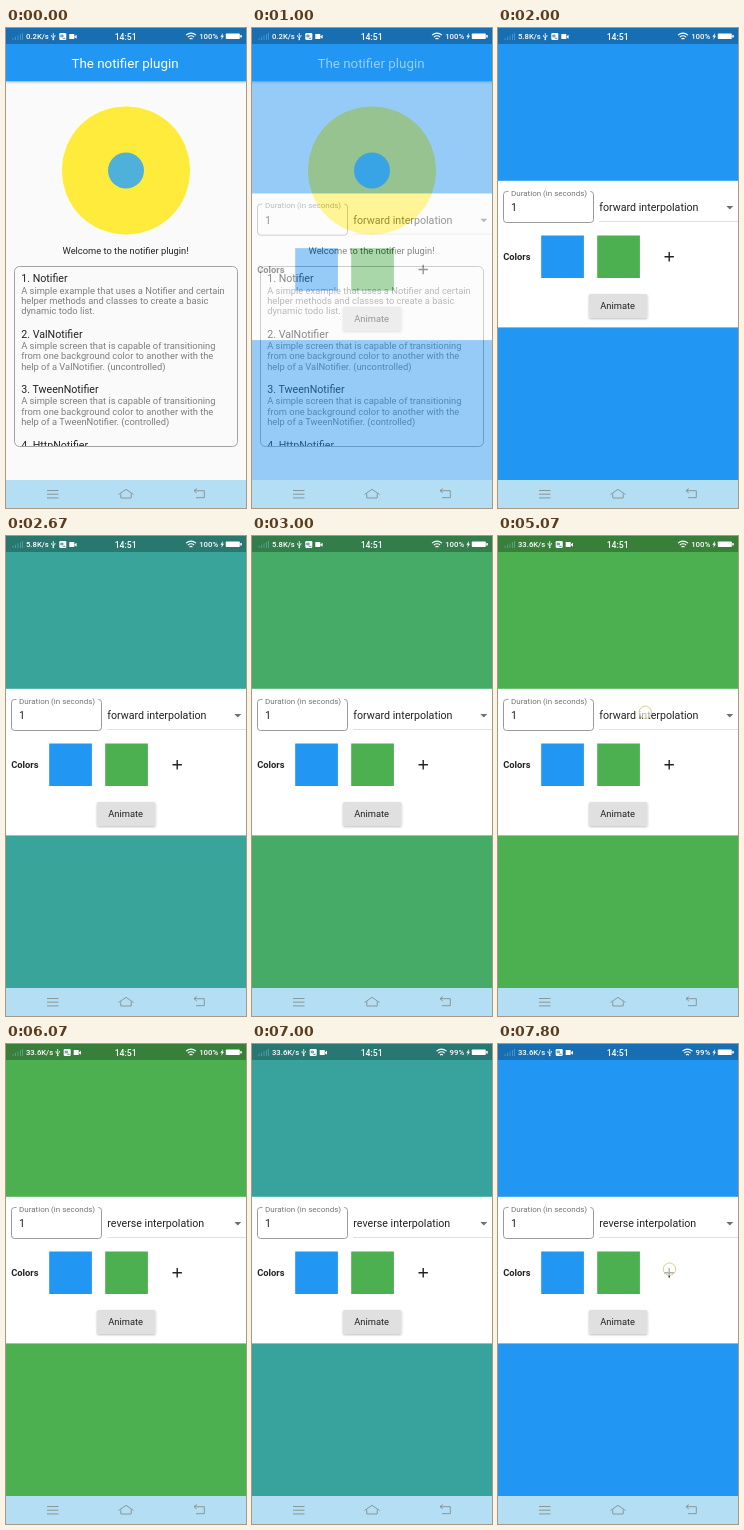
An HTML page for the animation above (8000 ms loop, 240x480 px).

```html
<!DOCTYPE html>
<html lang="en">
<head>
<meta charset="utf-8">
<title>Notifier demo</title>
<style>
  html, body { margin: 0; width: 100%; height: 100%; overflow: hidden; background: #fafafa; }
  svg { display: block; width: 100%; height: 100%; font-family: Roboto, sans-serif; }
  text { white-space: pre; }
  .body { font-size: 9.33px; }
  .big { font-size: 10.67px; }
  .note { font-size: 9.33px; fill: #7d7d7d; }
  .line { fill: none; stroke: #84908f; stroke-width: .9; }
</style>
</head>
<body>
<svg viewBox="0 0 240 480" preserveAspectRatio="none" fill="#212121">
  <defs>
    <clipPath id="listClip"><rect x="9" y="239" width="222" height="179"/></clipPath>
    <clipPath id="menuClip"><rect id="menuWindow" x="90" width="150"/></clipPath>
    <filter id="shadow" x="-20%" y="-20%" width="140%" height="150%">
      <feDropShadow dx="0" dy="1" stdDeviation="1" flood-opacity=".26"/>
    </filter>
  </defs>

  <g id="home">
    <rect width="240" height="480" fill="#fafafa"/>
    <rect width="240" height="53.3" fill="#2196f3" filter="url(#shadow)"/>
    <text x="119" y="39.5" font-size="13.4" text-anchor="middle" fill="#fff">The notifier plugin</text>
    <circle cx="120" cy="142.5" r="64.7" fill="#ffeb3b" stroke="#fff"/>
    <circle cx="120" cy="142.5" r="18" fill="#4fb1da"/>
    <text class="body" x="119.6" y="225.5" text-anchor="middle">Welcome to the notifier plugin!</text>
    <g clip-path="url(#listClip)">
      <rect id="highlight" x="9" y="298" width="222" height="55" fill="#000"/>
      <g id="list"></g>
    </g>
    <rect x="8.5" y="238.5" width="223" height="180" rx="5" fill="none" stroke="#a2a2a2"/>
  </g>

  <g id="page">
    <rect id="backdrop" width="240" height="480"/>
    <rect y="152.8" width="240" height="146.6" fill="#fff"/>
    <path d="M10.5 163.5H8.5a3 3 0 0 0-3 3v25a3 3 0 0 0 3 3h84a3 3 0 0 0 3-3v-25a3 3 0 0 0-3-3h-.5" fill="none" stroke="#9a9a9a"/>
    <text x="13" y="167.6" font-size="8" fill="#757575">Duration (in seconds)</text>
    <text class="big" x="13" y="183">1</text>
    <text id="choice" class="big" x="101.3" y="183"></text>
    <path d="M101 193.5H240" stroke="#d4d4d4" stroke-width=".7"/>
    <path d="M228.3 178h7l-3.5 3.5z" fill="#707070"/>
    <text class="body" x="5.2" y="232.2" font-weight="700">Colors</text>
    <rect x="43.2" y="207.5" width="42.7" height="42.5" fill="#2196f3"/>
    <rect x="99.2" y="207.5" width="42.7" height="42.5" fill="#4caf50"/>
    <path d="M166.5 228.8h9.4M171.2 224.1v9.4" stroke="#222" stroke-width="1.4"/>
    <rect x="91" y="266" width="58.5" height="24" rx="1.5" fill="#e0e0e0" filter="url(#shadow)"/>
    <text class="body" x="119.6" y="281.4" text-anchor="middle">Animate</text>
  </g>

  <g id="menu" filter="url(#shadow)">
    <g clip-path="url(#menuClip)">
      <rect x="90" y="158" width="150" height="76" fill="#fff"/>
      <text class="big" x="101.3" y="183">forward interpolation</text>
      <text class="big" x="101.3" y="215">reverse interpolation</text>
    </g>
  </g>

  <g id="status" fill="#fff" font-weight="500">
    <rect width="240" height="16" fill="#000" opacity=".27"/>
    <path d="M7 12v-2M9.5 12V8.8M12 12V7.4M14.5 12V6M16.5 12V4.8" stroke="#7fd0e8" stroke-opacity=".4"/>
    <text id="speed" x="20" y="11.3" font-size="7.7"></text>
    <g id="notices">
      <path d="M47.3 5v6.5M45.6 7v1.6l1.7 1.2 1.7-1.4V7" fill="none" stroke="#fff" stroke-width=".8"/>
      <circle cx="47.3" cy="11.4" r=".8"/>
      <rect x="53.3" y="5" width="7" height="7" rx="1.2"/>
      <path d="M54.8 7.2h2.2v1.6h-2.2zM56.8 10.3h2.5" stroke="#3b6f96" stroke-width=".8" fill="none"/>
      <path d="M63.3 6h5v5h-5zM68.6 8.2l2-1.5v4l-2-1.5z"/>
    </g>
    <text x="119.7" y="11.6" font-size="8.7" text-anchor="middle">14:51</text>
    <g id="wifi" fill="none" stroke="#fff" stroke-width="1.1">
      <path d="M180 7.2q5-4.2 10 0M181.8 9.1q3.2-2.6 6.4 0M183.5 11q1.5-1.2 3 0"/>
    </g>
    <text id="charge" x="212.2" y="11.3" font-size="7.8" text-anchor="end"></text>
    <path d="M217 5l-2.6 3.8h1.5l-.6 2.9 2.7-3.9h-1.5z"/>
    <rect x="219.8" y="5.5" width="14" height="5.6" rx=".8"/>
    <rect x="234.2" y="7.1" width="1.6" height="2.4"/>
  </g>

  <g>
    <rect y="452" width="240" height="28" fill="#b4def3"/>
    <path class="line" d="M41 462.5h11.5M41 466.2h11.5M41 469.9h11.5"/>
    <path class="line" d="M112.5 466.5l7.5-5.2 7.5 5.2M114.8 465.5v4.5h10.4v-4.5" stroke-linejoin="round"/>
    <path class="line" d="M190.8 460.5l-2.8 2.2 2.8 2.2M188 462.7h10.3v7h-8.3"/>
  </g>

  <circle id="touch" r="6.2" fill="#fff" fill-opacity=".65" stroke="#cfc77c" stroke-opacity=".8"/>
</svg>

<script>
const LOOP = 8000;
const BLUE = [33, 150, 243], GREEN = [76, 175, 80];
const items = [
  ["1. Notifier", "A simple example that uses a Notifier and certain", "helper methods and classes to create a basic", "dynamic todo list."],
  ["2. ValNotifier", "A simple screen that is capable of transitioning", "from one background color to another with the", "help of a ValNotifier. (uncontrolled)"],
  ["3. TweenNotifier", "A simple screen that is capable of transitioning", "from one background color to another with the", "help of a TweenNotifier. (controlled)"],
  ["4. HttpNotifier"]
];
// start, end, x, y
const touches = [
  [340, 600, 112, 324],
  [5070, 5200, 147.3, 176.3],
  [5800, 5900, 150, 212],
  [7800, 8000, 171.5, 225.2]
];

const el = id => document.getElementById(id);
const set = (id, attrs) => {
  for (const name in attrs) el(id).setAttribute(name, attrs[name]);
};
const progress = (t, start, end) => Math.min(1, Math.max(0, (t - start) / (end - start)));
const mix = (a, b, k) => a + (b - a) * k;

el("list").innerHTML = items.map((lines, i) => lines.map((line, j) => {
  const y = 254.3 + i * 55.4 + (j && 0.9 + j * 10.4);
  return `<text class="${j ? "note" : "big"}" x="15.2" y="${y}">${line}</text>`;
}).join("")).join("");

function draw(t) {
  const press = t < 600 ? progress(t, 330, 400) : 1 - progress(t, 600, 810);
  set("highlight", { opacity: press * 0.05 });

  const enter = progress(t, 810, 1110);
  set("page", {
    opacity: enter ** 1.7,
    transform: `translate(0 ${114 * (1 - enter) ** 2.17})`
  });

  const green = progress(t, 2100, 3150) - progress(t, 6530, 7530);
  const color = BLUE.map((c, i) => Math.round(mix(c, GREEN[i], green)));
  set("backdrop", { fill: `rgb(${color})` });
  el("choice").textContent = (t < 5870 ? "forward" : "reverse") + " interpolation";

  const grow = progress(t, 5275, 5420);
  const top = mix(164, 158.5, grow);
  set("menuWindow", { y: top, height: mix(196, 233.5, grow) - top });
  set("menu", { opacity: progress(t, 5200, 5275) * (1 - progress(t, 5870, 6070)) });

  const fast = t >= 5070, full = t < 6450;
  el("speed").textContent = fast ? "33.6K/s" : t < 1070 ? "0.2K/s" : "5.8K/s";
  el("charge").textContent = full ? "100%" : "99%";
  set("notices", { transform: `translate(${fast ? 4.4 : 0} 0)` });
  set("wifi", { transform: `translate(${full ? 0 : 4.5} 0)` });

  const touch = touches.find(([start, end]) => t >= start && t < end);
  set("touch", touch
    ? { cx: touch[2], cy: touch[3], visibility: "visible" }
    : { visibility: "hidden" });
}

function frame() {
  draw(performance.now() % LOOP);
  requestAnimationFrame(frame);
}
frame();
</script>
</body>
</html>
```
